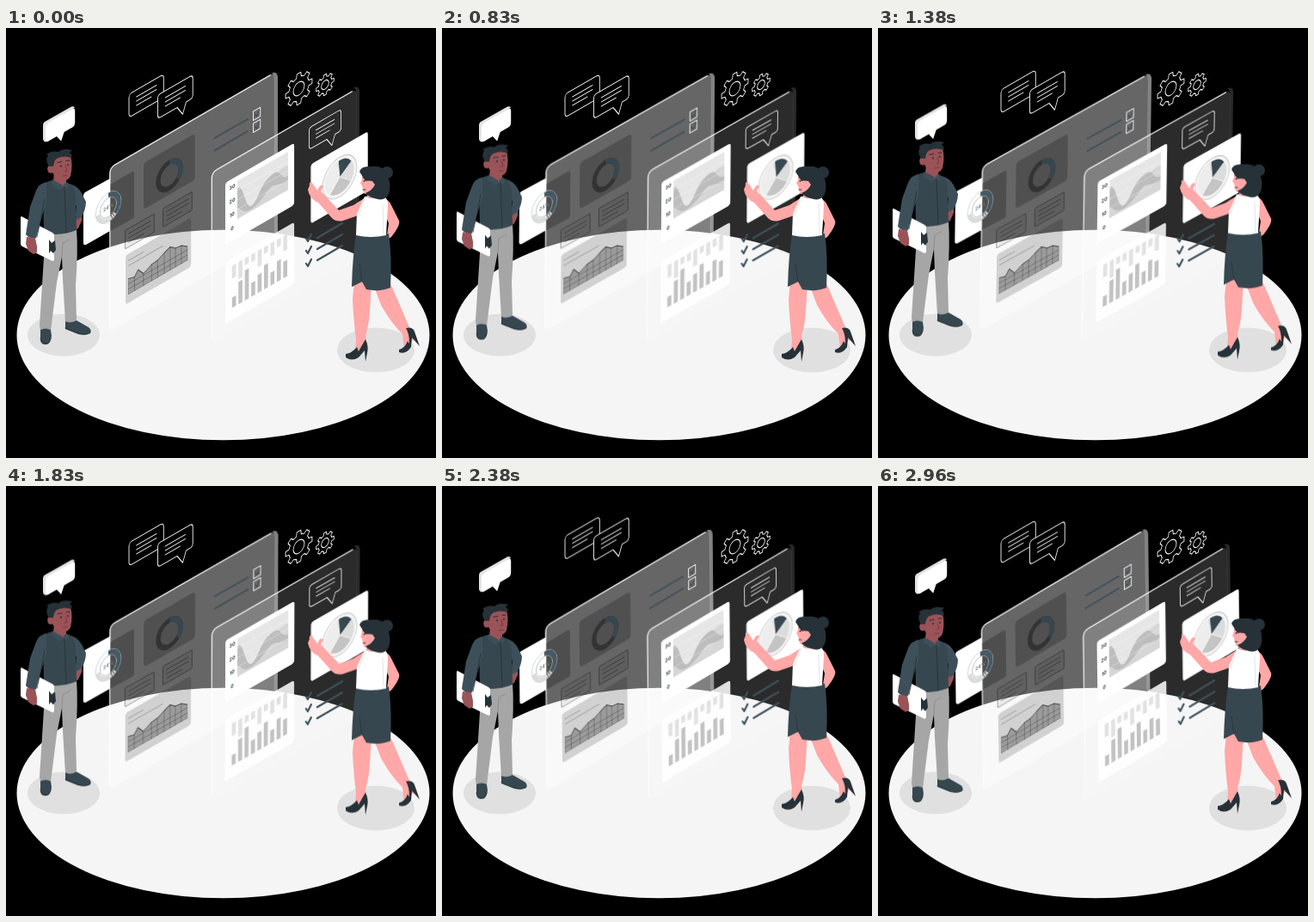
Write an HTML page that moves like this. It is 500 px wide and 500 px high and loops after 3000 ms.

```html
<!DOCTYPE html>
<html lang="en">
<head>
<meta charset="utf-8">
<title>Dashboard review</title>
<style>
  html, body { margin: 0; width: 100%; height: 100%; overflow: hidden; background: #000; }
  svg { display: block; width: 100vw; height: 100vh; }
  text { font: 700 6px Inter, Arial, sans-serif; text-anchor: middle; fill: #37474f; }
  .line { fill: none; stroke-linecap: round; stroke-linejoin: round; }
  .white { stroke: #fff; stroke-width: 1; }
  .navy { stroke: #3d515b; stroke-width: 2.2; }
  .skin { fill: #ffa8a7; }
  .brown { fill: #9b5358; }
  .cloth { fill: #37474f; }
  .sleeve { fill: #3d505a; }
  .dark { fill: #263238; }

  .man { animation: float 3s linear infinite; }
  .late { animation: rise 3s linear infinite; --h: -10px; }
  .high { --h: -20px; }
  .sway { animation: sway 3s linear infinite; }
  #back { transform-origin: 203px 203px; }
  #front { transform-origin: 329px 218px; }
  @keyframes float { 50% { transform: translateY(-10px); } }
  @keyframes rise {
    0%, 33.333% { transform: none; }
    83.333% { transform: translateY(var(--h)); }
    100% { transform: translateY(calc(var(--h) * .6667)); }
  }
  @keyframes sway {
    0%, 16.667% { transform: rotate(0deg); }
    41.667% { transform: rotate(1deg); }
    91.667% { transform: rotate(-1deg); }
    100% { transform: rotate(-.667deg); }
  }
</style>
</head>
<body>
<svg viewBox="0 0 500 500">
  <defs>
    <path id="say" d="M4 0H43q4 0 4 4V23q0 4-4 4H38L33.500 39 26 27.500H4q-4 0-4-4V4q0-4 4-4Z"/>
    <path id="note" d="M10 8H37M10 13H37M10 18H30"/>
    <linearGradient id="fade" x1="0" y1="0" x2="0" y2="1">
      <stop offset="0" stop-color="#fff" stop-opacity=".85"/>
      <stop offset="1" stop-color="#fff" stop-opacity=".45"/>
    </linearGradient>
  </defs>

  <ellipse cx="252.500" cy="357" rx="240" ry="122.300" fill="#f5f5f5"/>
  <g fill="#e0e0e0">
    <ellipse cx="67" cy="357" rx="42" ry="24.500"/>
    <ellipse cx="430" cy="374.500" rx="45" ry="26"/>
  </g>

  <g id="gears" class="line white"></g>

  <g class="late high">
    <g class="line white" transform="matrix(.866 -.5 0 1 143 77)">
      <rect width="46.500" height="27" rx="4"/><use href="#note"/>
    </g>
    <g class="line white" transform="matrix(.866 -.5 0 1 176.500 78)">
      <use href="#say" fill="#000"/><use href="#note"/>
    </g>
  </g>

  <!-- rear panel -->
  <g id="back" class="sway">
    <path d="M90 195q0-3 3-4.500L121 175V236L93 252q-3 1-3-2Z" fill="#fff"/>
    <g transform="matrix(.866 -.5 0 1 120 162)">
      <rect width="222" height="192" rx="7" fill="#fff" fill-opacity=".4"/>
      <path class="line" d="M1 188V8Q1 1 8 1H216" stroke="url(#fade)" stroke-width="1.600"/>
    </g>
    <path d="M309 52.500q6-2.500 7 4V243l-4 2.500V59q0-5-3-6.500Z" fill="#fff" fill-opacity=".5"/>
    <path d="M121 182 146 167.500q3-1.500 3 2V218q0 3-3 4.500L121 236Z" fill-opacity=".24"/>
    <g transform="matrix(.866 -.5 0 1 119 208.500)" class="line">
      <circle r="17" stroke="#c4cacc" stroke-width=".7"/>
      <circle r="11" stroke="#a9b0b3" stroke-width=".7"/>
      <path d="M0-14A14 14 0 0 1 9 11" stroke="#455a64" stroke-width="5" stroke-linecap="butt"/>
      <path d="M9 11A14 14 0 0 1-14 2" stroke="#d0d0d0" stroke-width="5" stroke-dasharray="2 .7" stroke-linecap="butt"/>
      <text y="2" style="font-size:6px;fill:#7b878c">24%</text>
    </g>

    <g transform="matrix(.866 -.5 0 1 160 157)">
      <rect width="69" height="54" rx="4" fill-opacity=".21"/>
      <g class="line" stroke-width="6" style="stroke-linecap:butt">
        <circle cx="34.600" cy="31.500" r="15" stroke="#333"/>
        <path d="M34.600 16.500A15 15 0 0 1 46 41.300" stroke="#37474f"/>
      </g>
    </g>

    <path class="line" d="M242.500 128 281 106M242.500 142.500 281 120" stroke="#3d515b" stroke-width="2"/>
    <g class="line white" transform="matrix(.866 -.5 0 1 287.500 97)">
      <path d="M0 0H9.500V10.500H0ZM0 14H9.500V24.500H0Z"/>
      <path d="M2.500 5 4.500 8 8.500 2M2.500 19 4.500 22 8.500 16" stroke="#37474f"/>
    </g>

    <g class="line" stroke="#000" stroke-opacity=".36" stroke-width="1.100">
      <g transform="matrix(.866 -.5 0 1 138.500 235.500)">
        <rect width="39" height="21.500" rx="1.500" fill="#000" fill-opacity=".05"/>
        <path d="M5 6H34M5 11H34M5 16H25"/>
      </g>
      <g transform="matrix(.866 -.5 0 1 182.500 210)">
        <rect width="39" height="21.500" rx="1.500" fill="#000" fill-opacity=".08"/>
        <path d="M5 6H34M5 11H34M5 16H25"/>
      </g>
    </g>

    <g transform="matrix(.866 -.5 0 1 139 264.500)">
      <rect width="88" height="57" rx="3" fill-opacity=".16"/>
      <path class="line" d="M4 8H24M4 14H50" stroke="#000" stroke-opacity=".25"/>
      <path d="M4 29 12 31 17 25 24 33 35 28 43 27 52 23 60 20 67 25 75 26 83 31V47H4Z" fill-opacity=".26"/>
      <path class="line" d="M4 29 12 31 17 25 24 33 35 28 43 27 52 23 60 20 67 25 75 26 83 31" stroke="#4a4a4a"/>
      <path class="line" d="M4 47V29M12 47V31M24 47V33M35 47V28M43 47V27M52 47V23M60 47V20M67 47V25M75 47V26M83 47V31M4 35H83M4 41H83M4 47H83" stroke="#000" stroke-opacity=".34" stroke-width=".7" stroke-dasharray="1.500 .8"/>
    </g>
  </g>

  <!-- near panel -->
  <g id="front" class="sway">
    <g transform="matrix(.866 -.5 0 1 238.500 167.500)">
      <rect width="195" height="199" rx="7" fill="#fff" fill-opacity=".17"/>
      <path class="line" d="M1 195V8Q1 1 8 1H189" stroke="url(#fade)" stroke-width="1.600"/>
    </g>
    <path d="M404 69.500q6-3 7 3V262l-4 2.500V75.500q0-5-3-6Z" fill="#fff" fill-opacity=".16"/>

    <g transform="matrix(.866 -.5 0 1 255 180)">
      <rect width="92.500" height="72" rx="3" fill="#fff"/>
      <g transform="translate(16.200 6)">
        <rect width="68" height="44" fill="#e6e6e6"/>
        <path d="M0 30C6 30 10 40 18 40S32 26 40 24 58 12 68 16V44H0Z" fill="#d6d6d6"/>
        <path d="M0 9C8 5 10 36 18 38S30 22 40 18 54 15 58 21 63 28 68 28V33C58 36 50 26 42 31S26 43 16 42 6 34 0 32Z" fill="#bdbdbd"/>
        <path class="line" d="M0 11H68M0 22H68M0 33H68" stroke="#fff" stroke-opacity=".5" stroke-width=".6"/>
      </g>
    </g>
    <g id="labels"></g>

    <g transform="matrix(.866 -.5 0 1 255 272)">
      <rect width="92.500" height="72" rx="3" fill="#fff" fill-opacity=".85"/>
      <g id="bars"></g>
    </g>

    <g class="line white" transform="matrix(.79 -.456 0 .92 352.500 116)">
      <use href="#say"/><use href="#note"/>
    </g>

    <g transform="matrix(.866 -.5 0 1 354.500 158.500)">
      <rect width="76.500" height="69" rx="3" fill="#fff"/>
      <path class="line" d="M.5 66V3" stroke="#d5d5d5"/>
      <g transform="translate(38.700 34)">
        <circle r="23" fill="#f3f3f3" stroke="#c9c9c9"/>
        <circle r="19" fill="#dcdcdc"/>
        <path d="M0 0-13 14A19 19 0 0 1-4-18.600Z" fill="#ededed"/>
        <path d="M0 0 15 11.700A19 19 0 0 1-13 14Z" fill="#c4c4c4"/>
        <path d="M0 0-2-19A19 19 0 0 1 15.500-11Z" fill="#37474f"/>
        <path class="line" d="M-13 14 0 0 15 11.700M0 0-2-19" stroke="#fff" stroke-width=".7"/>
      </g>
    </g>

    <path class="line navy" d="M362 244 391 227M362 257 391 240M362 270 391 253"/>
    <path class="line navy" d="M349 245 351 248 355 240M349 259 351 262 355 254M349 274 351 277 355 269"/>
  </g>

  <g class="late">
    <path d="M43 113q0-3 3-4.500L76 91.500q3-1 4 1L50 111V131l-4 1.500q-3-1-3-4Z" fill="#e4e4e4"/>
    <path transform="matrix(.866 -.5 0 1 46 112)" d="M4 0H36q3.500 0 3.500 4V17.500q0 4-3.500 4H25L21 30 15 21.500H4q-4 0-4-4V4q0-4 4-4Z" fill="#fff"/>
  </g>

  <!-- man -->
  <g class="man">
    <path class="brown" d="M80 220 88 217 88 224 84 233 80 235Z"/>
    <path class="sleeve" d="M73 181Q83 183 88 192L93 202Q93 210 88 220L80 224 82 207 75 198Z"/>
    <path d="M46 236 82 233Q84 260 81 300L82 339 80 343 69 342 66 292 65 266 59 296 52 352 40 352 39 346Z" fill="#a6a6a6"/>
    <path d="M65 266 66 250 74 246" class="line" stroke="#8f8f8f"/>
    <path class="cloth" d="M40 351Q46 348 52 351L53 358Q52 368 46 368 40 368 40 362ZM69 341Q75 344 82 340L96 348Q100 351 98 355 93 358 84 356L69 350Z"/>
    <path d="M69 349 84 355Q93 358 98 354M40 361Q41 367 46 367T52 361" class="line" stroke="#263238" stroke-width=".8"/>
    <path class="cloth" d="M54 177Q44 179 43 184L44 238Q62 243 82 235L81 195Q80 183 70 179Z"/>
    <path class="line" d="M68 184 70 237" stroke="#263238" stroke-width=".8"/>
    <path d="M18 219 54 238q2 1 2 3V269q0 2-2 2L19 254q-2-1-2-3V221q0-2 1-2Z" fill="#fff"/>
    <path class="dark" d="M50 246 53 250 57 247 58 258 55 262 52 259 50 262Z"/>
    <path class="sleeve" d="M47 179Q38 181 35 189L28 208 23 240Q28 246 35 244L42 218 47 202Z"/>
    <path class="line" d="M45 199 41 220 36 243" stroke="#263238" stroke-width=".8"/>
    <path class="brown" d="M24 243 34 244 36 254 36 261 32 263 26 259 23 251Z"/>
    <path class="brown" d="M56 168H70V180L66 185 55 178Z"/>
    <path class="brown" d="M53 150 75 148Q78 160 75 172 72 179 64 177 57 174 54 168Z"/>
    <ellipse class="brown" cx="52" cy="164" rx="3.800" ry="4.800"/>
    <path class="dark" d="M50 161Q45 154 49 148L47 147Q53 142 61 144 66 139 77 142L74 145Q78 147 76 151 68 148 61 151 56 152 55 161Z"/>
    <path class="sleeve" d="M54 176 66 183 63 189 53 182ZM70 179 66 183 71 188 73 182Z"/>
    <path class="line" d="M60 156.500 65 155.500M70 154.500 74 154" stroke="#263238" stroke-width="1.200"/>
    <path class="line" d="M69 160 71 166 68 167M66 172 71 171.500" stroke="#6b343a" stroke-width=".8"/>
    <circle class="dark" cx="64" cy="160.500" r="1.100"/><circle class="dark" cx="72" cy="159" r="1.100"/>
  </g>

  <!-- woman -->
  <g class="late">
    <path class="skin" d="M439 199Q445 199 448 206L457 224Q459 229 448 243L442 247 445 227 440 215Z"/>
    <path class="skin" d="M405 294H425L423 330Q422 345 418 358L420 372 406 377 407 362Q404 340 403 315ZM427 298 447 297 460 327 469 348 474 362 463 374 461 356Q447 342 436 322Z"/>
    <path class="dark" d="M395 379Q402 378 408 371L410 376Q415 367 418 362 422 370 420 378L418 388 417 375 410 383Q402 388 395 383ZM457 374Q464 372 467 364L469 367Q469 355 465 349 473 347 475 353L481 370 472 360 471 371Q465 380 457 377Z"/>
    <path class="cloth" d="M407 240 445 239Q449 265 447 302 435 307 419 304L414 295 402 301Q403 265 407 240Z"/>
    <path class="line" d="M414 295 411 275" stroke="#263238" stroke-width=".7"/>
    <path class="skin" d="M418 197 404 206 387 212 370 194 366 190 369 184Q367 181 364 185L362 189 356 180Q352 178 353 183L351 188Q353 199 363 203L379 221Q384 226 392 224L415 216Z"/>
    <path d="M417 196 438 194Q445 199 444 207L442 241Q424 245 407 241L408 216Z" fill="#fff"/>
    <path class="line" d="M417 198Q413 210 410 218M438 205 439 239" stroke="#dedede" stroke-width=".8"/>
    <path class="skin" d="M421 184H433V196Q427 200 420 197Z"/>
    <path class="skin" d="M414 166 430 164 431 187Q421 196 416 192L414 183 412 181 414 176Z"/>
    <circle class="dark" cx="443" cy="168" r="7"/>
    <path class="dark" d="M411 167Q413 160 424 161 438 159 442 169 449 181 445 193 441 201 432 199 422 197 418 192 426 189 429 182 424 176 418 178 417 170Z"/>
    <circle class="skin" cx="424" cy="181" r="3.300"/>
    <path class="line" d="M415 174 418 173M415 188 418 188" stroke="#263238" stroke-width=".9"/>
    <circle class="dark" cx="416.500" cy="178" r=".9"/>
  </g>
</svg>
<script>
  const el = id => document.getElementById(id);
  const iso = (x, y) => `transform="matrix(.866 -.5 0 1 ${x} ${y})"`;

  // Eight teeth, each a trapezoid on the root circle.
  function gear(x, y, r, hole) {
    const pts = [];
    for (let i = 0; i < 8; i++) {
      for (const [turn, k] of [[-.3, .76], [-.19, 1], [.19, 1], [.3, .76]]) {
        const a = (i + turn) * Math.PI / 4;
        pts.push((r * k * Math.cos(a)).toFixed(2) + ' ' + (r * k * Math.sin(a)).toFixed(2));
      }
    }
    return `<g ${iso(x, y)}><path d="M${pts.join('L')}Z"/><circle r="${hole}"/></g>`;
  }
  el('gears').innerHTML = gear(340.5, 70.5, 18, 7.5) + gear(371, 66, 12, 5);

  el('labels').innerHTML = ['30', '20', '10', '0']
    .map((s, i) => `<text ${iso(263, 187 + 16 * i)}>${s}</text>`).join('');

  // Each column: a pale part hanging from the top, a darker one standing below.
  const low = [12, 26, 35, 16, 21, 28, 15, 24, 19];
  const high = [15, 20, 8, 9, 19, 8, 15, 9, 18];
  const base = 58, tall = 49;
  el('bars').innerHTML = low.map((h, i) => {
    const bar = (y, h, fill) =>
      `<rect x="${9 + i * 8.6}" y="${y}" width="5.4" height="${h}" fill="${fill}"/>`;
    return bar(base - tall, high[i], '#e2e2e2') + bar(base - h, h, '#c2c2c2');
  }).join('');
</script>
</body>
</html>
```
